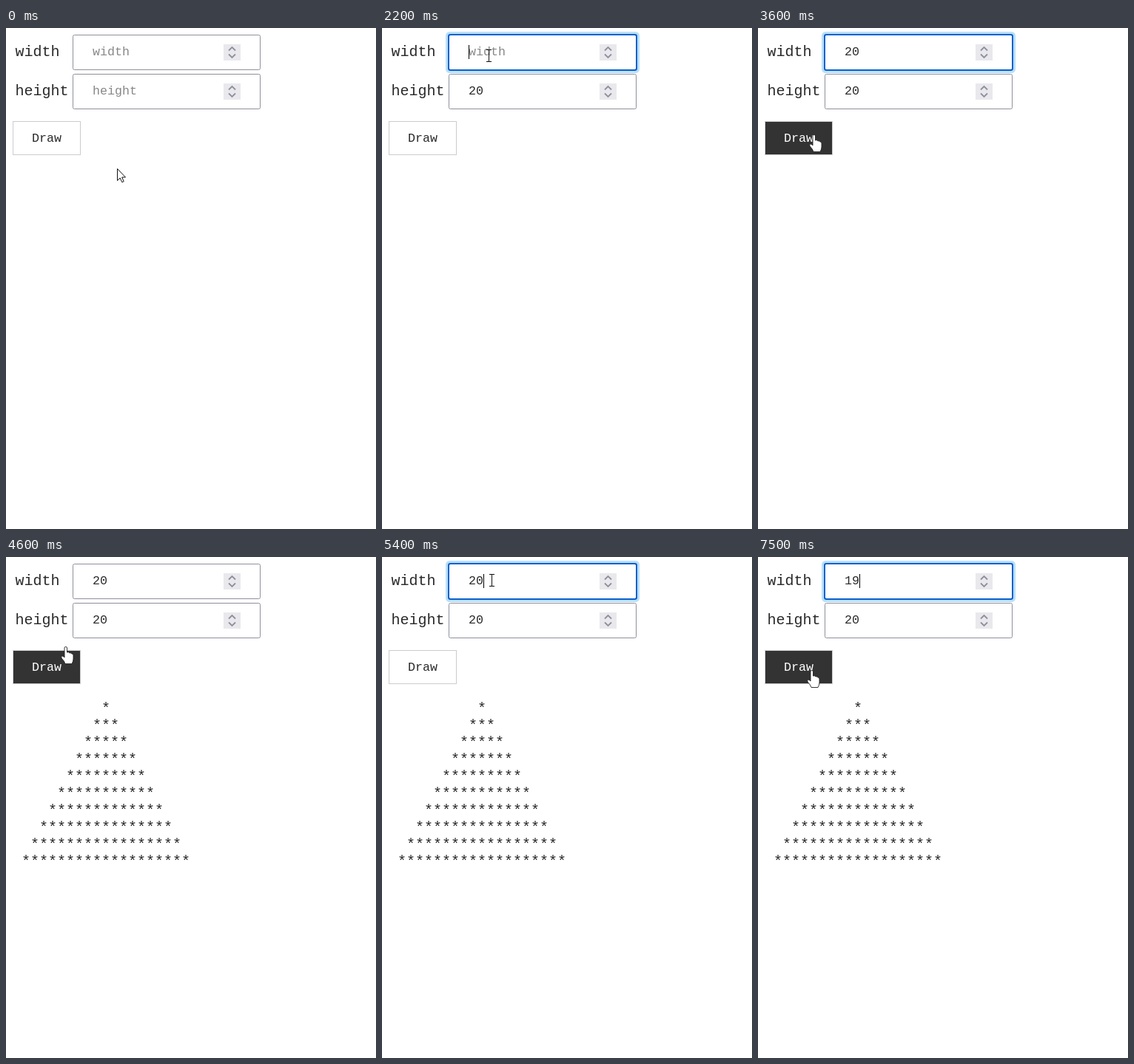
An HTML page that plays this animation: 500 by 678 pixels, repeating every 8 s.

```html
<!DOCTYPE html>
<html lang="en">
<head>
<meta charset="utf-8">
<title>Draw a triangle</title>
<style>
  html, body { margin: 0; width: 100%; height: 100%; overflow: hidden; background: #fff; }
  svg { display: block; width: 500px; height: 678px; }
  text { font: 20px "Liberation Mono", monospace; fill: #2a2a2a; white-space: pre; }
  .small { font-size: 16.67px; }
  .box { fill: #fff; stroke: #8f8f9d; }
  .hover .box { stroke: #676774; }
  .halo, .ring { fill: none; visibility: hidden; }
  .halo { stroke: #b8e0f8; stroke-width: 3; }
  .ring { stroke-width: 2; }
  .focus .halo, .focus .ring { visibility: visible; }
  .empty text { fill: #888; }
  .mark { fill: #0078d7; visibility: hidden; }
  .selected .mark { visibility: visible; }
  .selected text { fill: #fff; }
  .chevron { fill: none; stroke: #8f8f9d; stroke-width: 1.8; }
  .button rect { fill: #fff; stroke: #ccc; }
  .button.hover rect { fill: #333; }
  .button.hover text { fill: #fff; }
</style>
</head>
<body>
<svg id="stage" viewBox="0 0 500 678" xmlns="http://www.w3.org/2000/svg"></svg>
<script>
const LOOP = 8000, TICK = 100, BLINK = 500;

// typing enters one character per tick; every action restarts the caret blink
const ACTIONS = [
  { at: 800, focus: 'height' },
  { at: 1200, type: '20' },
  { at: 2200, focus: 'width' },
  { at: 3000, type: '20' },
  { at: 3800, focus: '' },
  { at: 3900, drawn: true },
  { at: 5400, focus: 'width' },
  { at: 5600, selected: true },
  { at: 6000, type: '19' },
  { at: 6450 }
];

// pointer moves: begin, end, x, y
const START = { x: 150, y: 190 };
const MOVES = [
  [0, 200, 168, 50], [200, 300, 168, 86], [1300, 1900, 144, 37],
  [2900, 3200, 78, 137], [3200, 3600, 76, 150], [4500, 4600, 81, 127],
  [4600, 5200, 148, 31], [5400, 5800, 47, 27], [6400, 7100, 68, 108], [7100, 7500, 73, 159]
];

const stage = document.getElementById('stage');

function add(parent, tag, attrs, text) {
  const el = document.createElementNS('http://www.w3.org/2000/svg', tag);
  for (const key in attrs) el.setAttribute(key, attrs[key]);
  if (text) el.textContent = text;
  return parent.appendChild(el);
}

function rect(parent, cls, x, y, width, height, rx = 0) {
  return add(parent, 'rect', { class: cls, x, y, width, height, rx });
}

function makeField(name, y, accent) {
  add(stage, 'text', { x: 12.5, y: y + 29 }, name);
  const g = add(stage, 'g');
  rect(g, 'halo', 87.5, y - 2.5, 259, 53, 4);
  rect(g, 'box', 90.5, y + .5, 253, 47, 2);
  rect(g, 'ring', 90, y, 254, 48, 2).style.stroke = accent;
  rect(g, 'mark', 117, y + 14, 20, 19);
  const value = add(g, 'text', { class: 'small', x: 117, y: y + 28 });
  const caret = rect(g, '', 117, y + 14, 1, 19);
  add(g, 'rect', { x: 294, y: y + 13, width: 23, height: 22, fill: '#e9e9ed' });
  add(g, 'path', {
    class: 'chevron',
    d: `M301 ${y + 21.5}l4.5-4.5 4.5 4.5M301 ${y + 26.5}l4.5 4.5 4.5-4.5`
  });
  return { name, y, g, value, caret };
}

const fields = [makeField('width', 9, '#0a60cc'), makeField('height', 62, '#0f68a8')];

const button = add(stage, 'g');
rect(button, '', 9.5, 126.5, 91, 45);
add(button, 'text', { class: 'small', x: 35, y: 154 }, 'Draw');

const triangle = add(stage, 'g', { 'text-anchor': 'middle' });
for (let row = 0; row < 10; row++) {
  add(triangle, 'text', { x: 135, y: 211 + 23 * row }, '*'.repeat(2 * row + 1));
}

// pointer shapes, each with its hot spot at 0,0
const pointers = {
  arrow: add(stage, 'path', {
    d: 'M.5 .5V16.5L4.2 13 6.8 18.7 9.2 17.6 6.7 12H11.5Z', fill: '#fff', stroke: '#111'
  }),
  beam: add(stage, 'path', {
    d: 'M-3 -7.5H4M.5 -7.5V8.5M-3 8.5H4', fill: 'none', stroke: '#111'
  }),
  hand: add(stage, 'path', {
    d: 'M-2 7V-4Q-2-5.500-.3-5.500T1.500-4V2Q4 1 5 3 7 2 7.700 4 10 3.500 10 6V11' +
       'Q10 14 8 17.500H-1Q-2 14-5.500 10.500-7 8-5.500 7-4 6.500-2 9Z',
    fill: '#fff', stroke: '#222', 'stroke-width': .9
  })
};

const inside = (p, x, y, w, h) => p.x >= x && p.x < x + w && p.y >= y && p.y < y + h;

function pointAt(t) {
  let { x, y } = START;
  for (const [begin, end, toX, toY] of MOVES) {
    const k = Math.min(1, Math.max(0, (t - begin) / (end - begin)));
    x += (toX - x) * k;
    y += (toY - y) * k;
  }
  return { x: Math.round(x), y: Math.round(y) };
}

function stateAt(t) {
  const s = { focus: '', width: '', height: '', touched: 0, selected: false, drawn: false };
  for (const { at, type, ...change } of ACTIONS) {
    if (at > t) break;
    Object.assign(s, change, { touched: at });
    if (type) {
      const typed = Math.min(type.length, Math.floor((t - at) / TICK) + 1);
      s[s.focus] = type.slice(0, typed);
      s.touched = at + (typed - 1) * TICK;
      s.selected = false;
    }
  }
  s.caret = !s.selected && Math.floor((t - s.touched) / BLINK) % 2 === 0;
  return s;
}

function render(t) {
  const s = stateAt(t), p = pointAt(t);
  let shape = s.selected ? 'beam' : 'arrow';

  for (const { name, y, g, value, caret } of fields) {
    const focused = s.focus === name, hover = inside(p, 90, y, 254, 48);
    if (hover || inside(p, 13, y + 13, 71, 20)) shape = 'beam';
    g.classList.toggle('focus', focused);
    g.classList.toggle('hover', hover);
    g.classList.toggle('empty', !s[name]);
    g.classList.toggle('selected', focused && s.selected);
    value.textContent = s[name] || name;
    caret.setAttribute('x', 117 + 10 * s[name].length);
    caret.style.display = focused && s.caret ? '' : 'none';
  }

  const pressable = inside(p, 9, 126, 92, 46);
  if (pressable) shape = 'hand';
  button.setAttribute('class', pressable ? 'button hover' : 'button');
  triangle.style.display = s.drawn ? '' : 'none';

  for (const key in pointers) {
    pointers[key].style.display = key === shape ? '' : 'none';
  }
  pointers[shape].setAttribute('transform', `translate(${p.x} ${p.y})`);
}

const start = performance.now();
let last = -1;
function loop() {
  const t = Math.floor((performance.now() - start) % LOOP / TICK) * TICK;
  if (t !== last) render(last = t);
  requestAnimationFrame(loop);
}
render(0);
loop();
</script>
</body>
</html>
```
